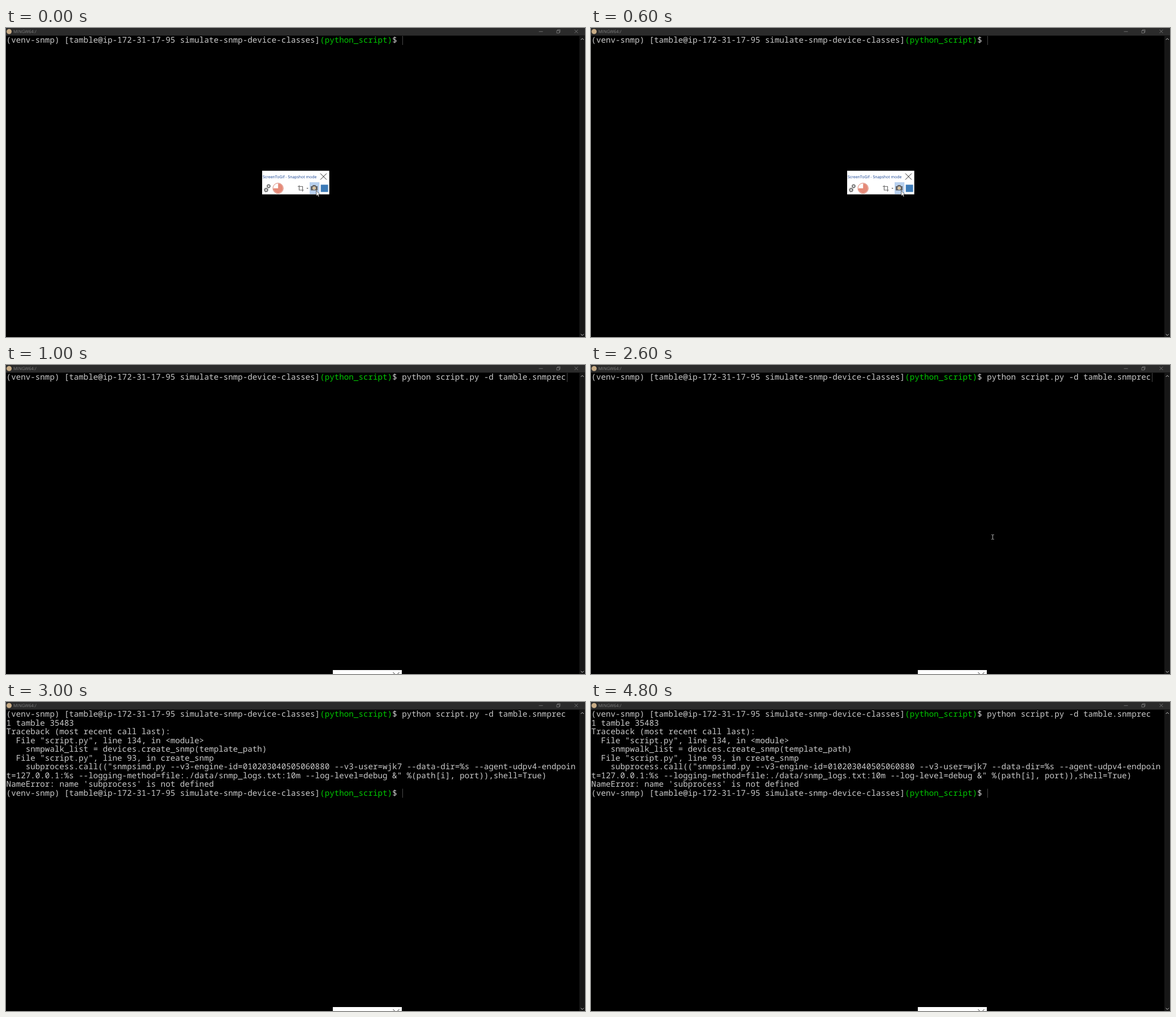
These frames come from a looping animation (1024 px wide and 547 px high, 6 s). An HTML page:

```html
<!DOCTYPE html>
<html lang="en">
<head>
<meta charset="utf-8">
<title>Terminal session</title>
<style>
  html, body { margin: 0; width: 100%; height: 100%; overflow: hidden; background: #000; }
  svg { display: block; width: 100%; height: 100%; }
  text { white-space: pre; text-rendering: geometricPrecision; }
  .term { font: 500 14.23px "Noto Sans Mono", monospace; fill: #cbcbcb; }
  .branch { fill: #00c800; }
  .ui { font-family: "Open Sans", sans-serif; }
  .line { fill: none; }
</style>
</head>
<body>
<svg viewBox="0 0 1024 547">
  <rect width="1024" height="547" fill="#000"/>

  <!-- Window frame -->
  <rect width="1024" height="13.5" fill="#2b2b2b"/>
  <circle cx="5.5" cy="6.3" r="4.5" fill="#c9ad87"/>
  <text class="ui" x="13" y="9" font-size="7.6" fill="#808080">MINGW64:/</text>
  <path class="line" stroke="#8a8a8a" stroke-width=".7"
        d="M942.5 6.3h7M974 4.5h4.5v4.5h-4.5zM975.5 4.5v-1.5h4.5v4.5h-1.5M1005.5 3l6 6M1011.5 3l-6 6"/>
  <rect x="1014" y="13.5" width="10" height="533.5" fill="#171717"/>
  <path class="line" stroke="#c8c8c8" d="M1016.7 21l2.6-2.6 2.6 2.6M1016.7 541.8l2.6 2.6 2.6-2.6"/>

  <g id="terminal"></g>
  <rect id="caret" width="1" height="16" fill="#484848"/>

  <!-- Recorder toolbar -->
  <g id="toolbar">
    <rect x="453" y="252.7" width="118.7" height="41.8" fill="#fff"/>
    <text class="ui" x="454" y="266.2" font-size="6.95" fill="#123f91">ScreenToGif - Snapshot mode</text>
    <path class="line" stroke="#222" d="M556 257.5l11 11M567 257.5l-11 11"/>
    <g class="line" stroke="#6b6b6b">
      <circle cx="464.5" cy="280" r="2.2" stroke-width="1.5"/>
      <circle cx="464.5" cy="280" r="3.4" stroke-dasharray="1.33"/>
      <circle cx="460" cy="286.7" r="2.4" stroke-width="1.7"/>
      <circle cx="460" cy="286.7" r="3.8" stroke-dasharray="1.49"/>
      <path stroke-width="1.2" d="M518.5 278.5v8.5h8M516 280.5h8.5v9"/>
    </g>
    <circle class="line" cx="481.2" cy="283.8" r="9.2" stroke="#d9806f"/>
    <path d="M481.2 283.8v-8.5a8.5 8.5 0 1 1 -8.5 8.5z" fill="#e58a78"/>
    <path d="M531.3 283h3.6l-1.8 2z" fill="#666"/>
    <rect x="537" y="273" width="17.3" height="21" fill="#b8d0ee"/>
    <path d="M539 280h2.5l1.3-2h4.4l1.3 2h2.5v7.5h-12z" fill="#646464"/>
    <circle cx="545" cy="283.4" r="2.5" fill="#d8b987" stroke="#eee" stroke-width=".8"/>
    <rect x="556.7" y="277.4" width="12.9" height="12.9" fill="#3c7ab7"/>
  </g>
  <g id="dockedToolbar">
    <rect x="578" y="540" width="122" height="7" fill="#fff"/>
    <path class="line" stroke="#222" d="M684.5 544l5.5 5.5 5.5-5.5"/>
  </g>

  <path id="arrow" d="M548.8 288.2v9.2l2.1-2 1.5 3.4 1.6-.7-1.5-3.2h2.8z"
        fill="#fff" stroke="#000" stroke-width=".6"/>
  <path id="beam" class="line" stroke="#c8c8c8" stroke-width=".9"
        d="M708.3 300.5h1.6l.6.6.6-.6h1.6M710.5 301v7M708.3 308.5h1.6l.6-.6.6.6h1.6"/>
</svg>
<script>
const byId = id => document.getElementById(id);
const LOOP = 6000, ROW = 15.5, LEFT = 0.6, BASELINE = 26;

const prompt = '(venv-snmp) [tamble@ip-172-31-17-95 simulate-snmp-device-classes]' +
  '<tspan class="branch">(python_script)</tspan>$ ';
const command = 'python script.py -d tamble.snmprec';
const output = [
  '1 tamble 35483',
  'Traceback (most recent call last):',
  '  File "script.py", line 134, in &lt;module&gt;',
  '    snmpwalk_list = devices.create_snmp(template_path)',
  '  File "script.py", line 93, in create_snmp',
  '    subprocess.call(("snmpsimd.py --v3-engine-id=010203040505060880 --v3-user=wjk7 --data-dir=%s --agent-udpv4-endpoin',
  't=127.0.0.1:%s --logging-method=file:./data/snmp_logs.txt:10m --log-level=debug &amp;" %(path[i], port)),shell=True)',
  "NameError: name 'subprocess' is not defined",
];

const screens = {
  idle: [prompt],
  typed: [prompt + command],
  failed: [prompt + command, ...output, prompt],
};

const steps = [
  { start: 0, screen: 'idle', caret: [701, 14], show: ['toolbar', 'arrow'] },
  { start: 1000, screen: 'typed', caret: [992, 14], show: ['dockedToolbar'] },
  { start: 2000, screen: 'typed', caret: [992, 14], show: ['dockedToolbar', 'beam'] },
  { start: 3000, screen: 'failed', caret: [701, 153.5], show: ['dockedToolbar'] },
];

function render(step) {
  byId('terminal').innerHTML = screens[step.screen].map((line, row) =>
    `<text class="term" x="${LEFT}" y="${BASELINE + row * ROW}">${line}</text>`).join('');
  byId('caret').setAttribute('x', step.caret[0]);
  byId('caret').setAttribute('y', step.caret[1]);
  for (const id of ['toolbar', 'dockedToolbar', 'arrow', 'beam'])
    byId(id).style.display = step.show.includes(id) ? '' : 'none';
}

let current;
function tick() {
  const time = performance.now() % LOOP;
  const step = steps.findLast(s => s.start <= time);
  if (step !== current) render(current = step);
  requestAnimationFrame(tick);
}
tick();
</script>
</body>
</html>
```
